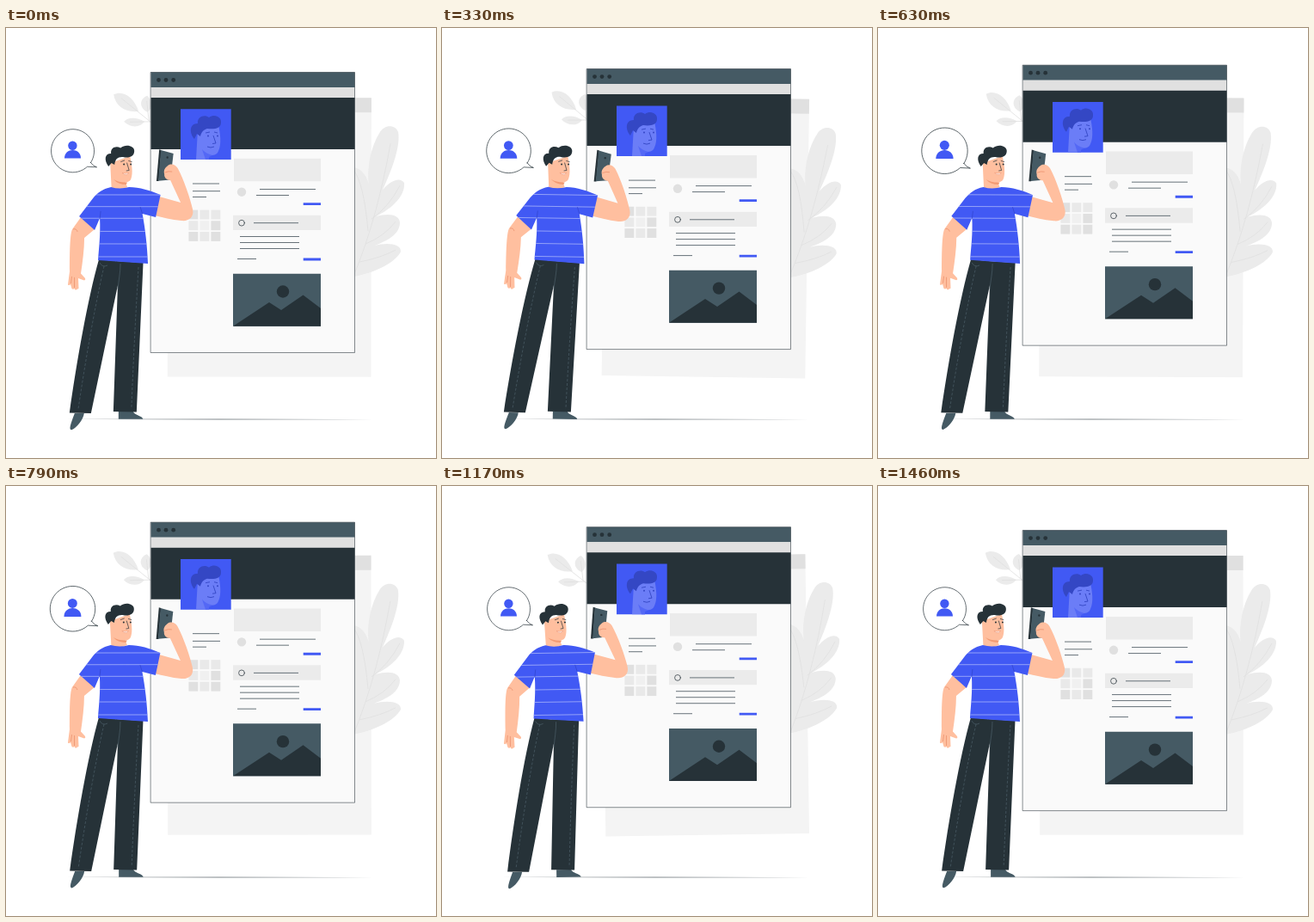
Write an HTML page that moves like this. It is 500 by 500 pixels and loops after 1500 ms.

```html
<!DOCTYPE html>
<html lang="en">
<head>
<meta charset="utf-8">
<title>Profile page</title>
<style>
  html, body { margin: 0; width: 100%; height: 100%; overflow: hidden; background: #fff; }
  svg { display: block; width: 100vw; height: 100vh; }
  .blue { fill: #4159f4; }
  .dark { fill: #263238; }
  .slate { fill: #455a64; }
  .skin { fill: #ffbf9f; }
  .pale { fill: #ebebeb; }
  .mid { fill: #e0e0e0; }
  .line { fill: none; stroke: #263238; stroke-width: .7; stroke-linecap: round; }
  .vein { fill: none; stroke: #e0e0e0; stroke-width: .8; }
  .text { stroke: #56626a; stroke-width: .9; fill: none; }
  .stripe { stroke: #a9b4fb; stroke-width: .8; fill: none; }
  .seam { stroke: #4c5f69; stroke-width: .7; stroke-dasharray: 3 2; fill: none; }
</style>
</head>
<body>
<svg viewBox="0 0 500 500">
  <defs>
    <path id="shirt" d="M122 185C112 187 106 192 101 198L85 219L103 235L109 221C110 240 108 255 107 270L165 274C164 252 162 235 158.500 216L174 220L179.500 194C168 189 155 185 143 185Q132 188 122 185Z"/>
    <clipPath id="shirtClip"><use href="#shirt"/></clipPath>
  </defs>

  <g id="back">
    <path fill="#f4f4f4" d="M188 81H424.700V405.700H188Z"/>
    <path class="mid" d="M188 81H424.700V98H188Z"/>
    <path class="pale" d="M404 289V162C413 163 421 172 423 188C418 166 424 138 434 122C440 111 453 112 456 121C459 140 446 170 438 188C446 178 458 172 463 180C464 196 448 210 430 219C444 215 457 216 458 226C458 240 442 248 428 253C442 249 460 250 459 260C452 273 430 284 404 289Z"/>
    <path class="vein" d="M404 289C424 240 437 190 447 134M404 165Q416 180 421 236M425 222Q445 208 458 183M418 251Q440 242 453 225M411 272Q436 267 453 258"/>
    <path class="pale" d="M154 97C149 81 136 72 125 77.500C127 92 140 99 154 97ZM164.500 98C155 94 154 83 164 79C171 85 170 94 164.500 98ZM161 109C151 103 141 104 137 109C144 116 155 117 161 109Z"/>
    <path class="vein" d="M134 82L170 111M163.500 85L166 108M144 109.500L168 109"/>
  </g>

  <g id="page">
    <path fill="#fafafa" d="M168.500 51.500H405.500V377.500H168.500Z"/>
    <path class="slate" d="M168.500 51.500H405.500V69H168.500Z"/>
    <path class="mid" d="M168.500 69H405.500V81H168.500Z"/>
    <path class="dark" d="M168.500 81H405.500V141H168.500Z"/>
    <path class="line" stroke-opacity=".8" d="M168.500 51.500H405.500V377.500H168.500Z"/>
    <g class="dark">
      <circle cx="177.500" cy="60.500" r="2.400"/><circle cx="186" cy="60.500" r="2.400"/><circle cx="194.700" cy="60.500" r="2.400"/>
    </g>

    <path class="blue" d="M203 94.300H261.700V153H203Z"/>
    <path fill="#6b7df7" d="M223 118L247 113C249 122 251 135 247 143C245 148 241 148 236 148V153H221Z"/>
    <path fill="#5468f5" d="M228 141Q232 146 240 148L236 150V153H232Z"/>
    <path fill="#3447c4" d="M219 129C213 122 213 111 223 111C222 103 231 100 236 104C243 99 251 104 250 110C250 117 242 118 234 117C230 118 227 121 226 126L222 123Z"/>
    <path fill="none" stroke="#3447c4" stroke-width=".9" d="M232 122L237 121M242 121L246 122M241 125L244 134L240 134.500M234 138Q238 140 242 138"/>
    <g fill="#3447c4"><circle cx="235" cy="125.500" r="1"/><circle cx="246" cy="125.500" r="1"/></g>

    <path class="text" d="M217 181H248M217 189.700H249M217 196.500H233M295 187.500H360M291 194.500H329"/>
    <g id="grid"></g>
    <path class="pale" d="M265 151.800H366V178.300H265ZM264 217.700H366V235H264Z"/>
    <circle class="mid" cx="274" cy="190.700" r="5.200"/>
    <circle class="line" cx="274" cy="226.700" r="3.400"/>
    <path class="text" d="M288 226.700H340M272 242.500H341M272 249.500H341M272 256.500H341M269 268.500H291"/>
    <path class="blue" d="M345.700 203.200H366V206H345.700ZM345.700 267.600H366V270.400H345.700Z"/>
    <path class="slate" d="M264 285.700H366V346.700H264Z"/>
    <path class="dark" d="M264 346.700L306 319L320 328L345.500 310.500L366 326V346.700Z"/>
    <circle class="dark" cx="322" cy="306.500" r="7.200"/>
  </g>

  <path fill="#a9aeb1" d="M69 454.700L248 454.300L427 455.300L248 455.700Z"/>

  <g id="man">
    <path class="slate" d="M80 448H91C90 456 82 465 76.500 467.300C73 467.500 75 461 80 448ZM131 446H148C149 450 159 451 159.500 454.700H131Z"/>
    <path class="dark" d="M108 269L136 272C134 285 131 290 130 299L99 448L74 447.500C82 390 95 315 108 269ZM128 271L159.500 273L152 446.500L125 446L130 298Z"/>
    <path class="seam" d="M114 277C103 325 92 390 84 444M154 278C151 330 148 390 146 443"/>
    <path fill="none" stroke="#4c5f69" stroke-width=".7" d="M133 274C133 285 131 293 130 304M109 273Q112 279 118 276"/>

    <path class="skin" d="M87 220L77 234C74 240 74 264 74 283L72 298.500Q73.500 300 75 298L76.500 303Q78 304.500 79.500 303L80.500 304.500Q82 305 83 303.500L84.500 303L84 291L91 293.500Q93 293 92 291L87 285.500C89 272 91 257 91 244L103 234Z"/>
    <path fill="none" stroke="#e88b68" stroke-width=".7" d="M75.500 297L76.500 289M79.500 302V290M78 234Q82 233 83 237"/>

    <path class="dark" d="M178 141.300L180.500 142L177.500 178L174.800 178Z"/>
    <path class="slate" d="M180 142L194.500 146L191 176.500L177 177.800Z"/>
    <circle class="dark" cx="187.500" cy="150.500" r="1.200"/>
    <path class="skin" d="M178 196L203 203L191 177C187 177 183.500 174 184 170C183 166 184 163 188 160C192 157 197 159 199.500 163C207 177 214 198 217 211C219 221 211 225 204 224C192 223 182 220 173 218Z"/>
    <path fill="none" stroke="#e88b68" stroke-width=".7" d="M184.500 168Q189 166 193 167"/>

    <path class="skin" d="M121 157L144 149C146 158 148 169 145 176C143 180 139 178.500 139 180L141 185Q132 189.500 122.500 185.500Z"/>
    <path fill="#f39a72" d="M125 176Q131 180 141 179.500L139.500 182Q130 182 125 176Z"/>
    <path class="dark" d="M119 161C114 154 114 146 122 146C121 139 128 136.500 133 139.500C139 134.500 149 137 149 143C149 150 142 151.500 136 150C130 149.500 127 152 126 159L122.500 157Z"/>
    <path class="line" stroke-width=".9" d="M133.500 155.500L137.500 154M142.500 154.500L146 155.500M140.500 157L143 165.500L140 166"/>
    <g class="dark"><circle cx="137" cy="158.500" r="1"/><circle cx="145" cy="158.500" r="1"/></g>
    <path fill="#fff" stroke="#e88b68" stroke-width=".5" d="M135 168.500Q139 170 142.500 168.500Q140 173 135 168.500Z"/>

    <use href="#shirt" class="blue"/>
    <path class="stripe" clip-path="url(#shirtClip)" d="M80 194H180M80 207.700H180M80 221.300H180M80 236.500H180M80 251H180M80 266H180"/>
    <path fill="none" stroke="#3044cc" stroke-width=".7" d="M109 222L110 213M158.500 216L156 208"/>
  </g>

  <g id="bubble">
    <path class="line" style="fill:#fff" d="M98.500 156.500Q101 160.500 105.500 161.800L94.500 161.200A25 25 0 1 1 98.500 156.500Z"/>
    <circle class="blue" cx="77.400" cy="136.800" r="5.200"/>
    <path class="blue" d="M68 151.500C68 139 87 139 87 151.500Z"/>
  </g>
</svg>
<script>
const $ = id => document.getElementById(id);
const LOOP = 1500, STEPS = 36, PHASE = 0.6;

const shades = ['#e0e0e0', '#e9e9e9', '#e9e9e9', '#e9e9e9', '#f0f0f0', '#e0e0e0', '#e0e0e0', '#e9e9e9', '#e0e0e0'];
$('grid').innerHTML = shades.map((c, i) =>
  `<rect x="${212.4 + i % 3 * 13}" y="${211.6 + Math.floor(i / 3) * 12.7}" width="10.9" height="10.9" fill="${c}"/>`).join('');

const linear = x => x;
const smooth = x => (1 - Math.cos(Math.PI * x)) / 2;

// Keys are [progress, value] pairs.
function track(keys, p, ease = linear) {
  const i = keys.findIndex(k => k[0] > p);
  const [p0, v0] = keys[i - 1], [p1, v1] = keys[i];
  return v0 + (v1 - v0) * ease((p - p0) / (p1 - p0));
}

const floating = [[0, 0.33], [0.5, -9.67], [1, 0.33]];
const sway = [[0, 0], [0.25, 1], [0.75, -1], [1, 0]];
const beat = [[0, 1], [0.14, 1.07], [0.28, 1], [0.42, 1.07], [0.7, 1], [1, 1]];

function pose(ms) {
  const step = Math.floor(ms % LOOP / LOOP * STEPS);
  const p = (step + PHASE) / STEPS;
  const angle = track(sway, p);
  const set = (id, t) => $(id).setAttribute('transform', t);
  set('page', `translate(0 ${track(floating, p)})`);
  set('back', `rotate(${angle} 306 243)`);
  set('man', `rotate(${angle} 145 302)`);
  set('bubble', `translate(78.5 143) scale(${track(beat, p, smooth)}) translate(-78.5 -143)`);
}

const start = performance.now();
function tick() {
  pose(performance.now() - start);
  requestAnimationFrame(tick);
}
tick();
</script>
</body>
</html>
```
